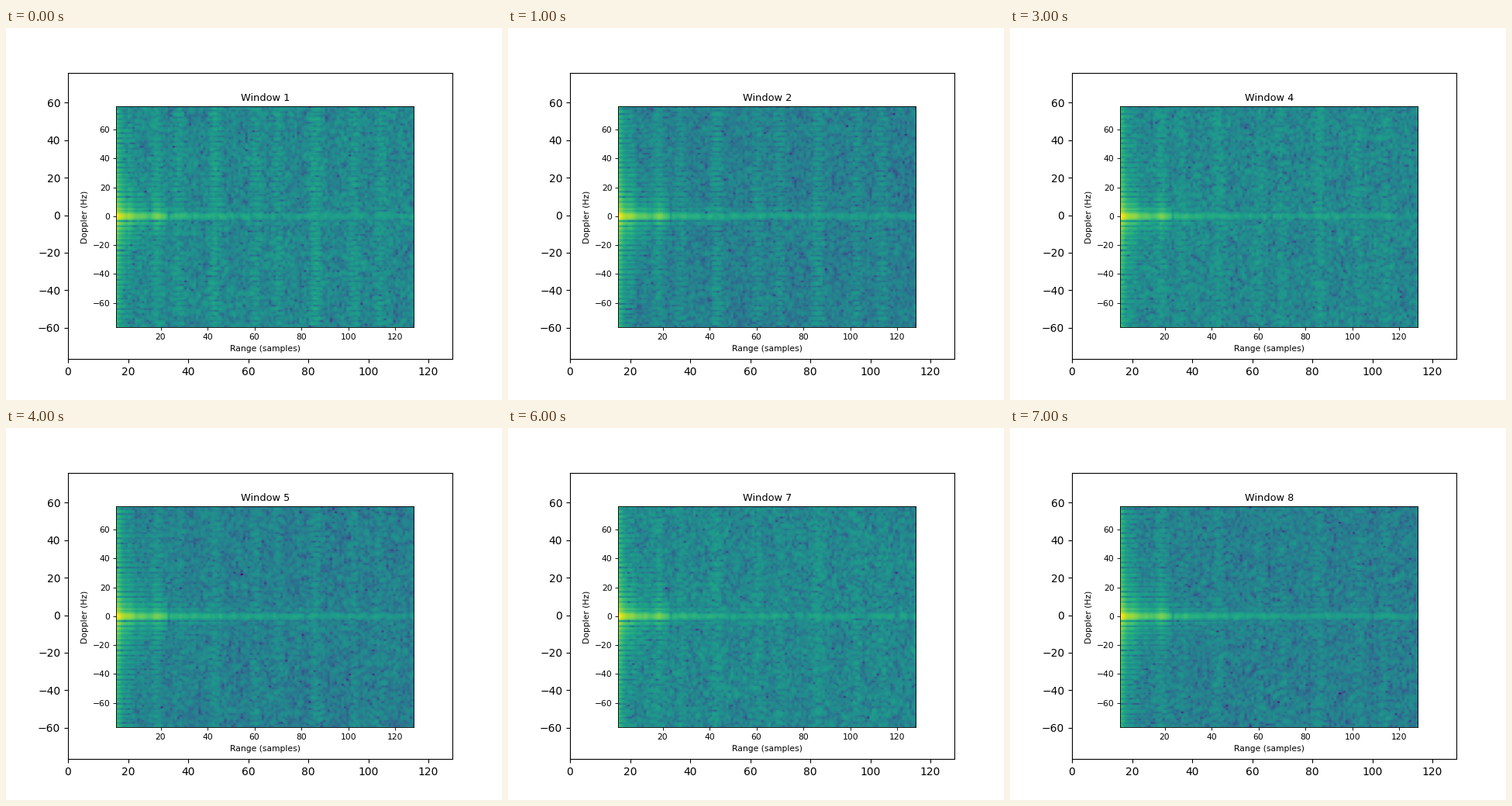
These frames come from a looping animation (640x480 px, 8 s). A matplotlib script:

```python
import numpy as np
import matplotlib.pyplot as plt
from matplotlib.animation import FuncAnimation

WINDOWS = 8
PULSES = 45       # slow-time samples in one window
BINS = 128        # zero-padded Doppler bins
DB_SPAN = 100     # dB covered by the colour map
LOW, HIGH = -76.75, 76.05   # Doppler limits in Hz
SHRINK = 0.7725   # scale of the nested plot
GAIN = 10 * np.log10(PULSES)

ranges = np.arange(1, 128)
freq = np.linspace(LOW, HIGH, BINS) / (HIGH - LOW)
dft = np.exp(-2j * np.pi * np.outer(freq, np.arange(PULSES)))


def bumps(centers, width):
    return sum(np.exp(-((ranges - c) / width) ** 2) for c in centers)


# Zero-Doppler brightness: fast and slow decay, one echo, one gap, a ripple
near = ranges - 1
clutter = (0.54 + 0.19 * np.exp(-near / 5) + 0.27 * np.exp(-near / 30)
           + 0.1 * bumps([19], 3) - 0.13 * bumps([23], 0.8)
           + 0.02 * np.cos(2 * np.pi * near / 5.5))

# Range bands that leak over all Doppler bins
strong = [42.5, 85.5]
weak = [17.5, 27, 60, 69.5, 102, 113]
leak = bumps(strong, 2.7) + 0.7 * bumps(weak, 2.7)


def complex_noise(rng, shape):
    return (rng.normal(size=shape) + 1j * rng.normal(size=shape)) / np.sqrt(2)


def doppler_map(k):
    rng = np.random.default_rng(40 + k)
    noise = complex_noise(rng, (PULSES, ranges.size + 2))
    noise = (noise[:, 1:-1] + 0.25 * (noise[:, :-2] + noise[:, 2:])) / 1.06

    floor = 0.457 + 0.023 * np.cos(2 * np.pi * k / 3)
    level = clutter + rng.normal(0, 0.008, ranges.size)
    amp = 10 ** (((level - floor) * DB_SPAN - GAIN) / 20)
    pulses = noise + amp * np.exp(1j * rng.uniform(0, 0.6, ranges.size))

    # A jump at both window edges gives fringes, at one edge a plain streak
    head = 1 - 0.04 * k
    tail = 0.75 if k < 3 else 0.15
    pulses[0] += 12 * head * leak
    pulses[-1] -= 12 * tail * leak
    power = 20 * np.log10(np.abs(dft @ pulses) + 1e-3) - GAIN
    return floor + power / DB_SPAN


maps = [doppler_map(k) for k in range(WINDOWS)]

fig = plt.figure(figsize=(6.4, 4.8), dpi=100)

outer = fig.add_axes([0.125, 0.11, 0.775, 0.77])
outer.set_xlim(0, 128)
outer.set_ylim(LOW, HIGH)

inner = fig.add_axes([0.125 + 0.775 * 0.125, 0.1115 + 0.77 * 0.11,
                      0.775 ** 2, 0.77 ** 2])
image = inner.imshow(maps[0], cmap="viridis", vmin=0, vmax=1, origin="lower",
                     extent=[1, 128, LOW, HIGH], aspect="auto",
                     interpolation="hanning")
inner.tick_params(labelsize=10 * SHRINK, length=3.5 * SHRINK,
                  width=0.8 * SHRINK, pad=3.5 * SHRINK)
inner.tick_params(axis="x", pad=3.5)
inner.set_xlabel("Range (samples)", fontsize=10 * SHRINK, labelpad=4 * SHRINK)
inner.set_ylabel("Doppler (Hz)", fontsize=10 * SHRINK, labelpad=4 * SHRINK)
title = inner.set_title("Window 1", fontsize=12 * SHRINK, pad=6.5 * SHRINK)
for spine in inner.spines.values():
    spine.set_linewidth(0.8 * SHRINK)


def update(k):
    image.set_data(maps[k])
    title.set_text(f"Window {k + 1}")
    return image, title


anim = FuncAnimation(fig, update, frames=WINDOWS, interval=1000,
                     repeat=True, repeat_delay=0)
plt.show()
```
